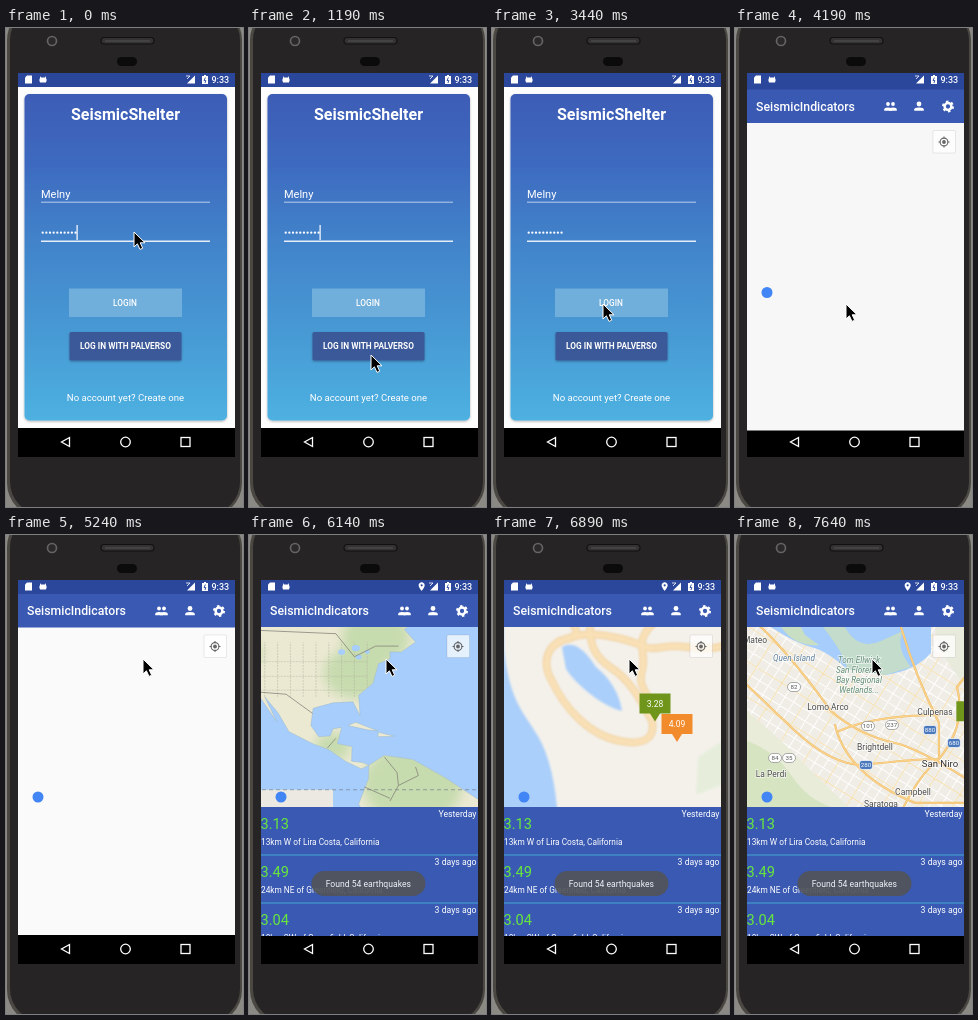
An HTML page that plays this animation: 237x479 px, repeating every 8000 ms.

```html
<!DOCTYPE html>
<html lang="en">
<head>
<meta charset="utf-8">
<title>Earthquake app</title>
<style>
html, body { margin: 0; width: 100%; height: 100%; overflow: hidden; background: #262425; }
svg { display: block; width: 237px; height: 479px; }
text { font-family: Roboto, "Noto Sans", sans-serif; fill: #fff; }
.mid { text-anchor: middle; }
.end { text-anchor: end; }
.line { fill: none; stroke-linecap: round; stroke-linejoin: round; }
.thin path { vector-effect: non-scaling-stroke; }
.place text { stroke: #fff; stroke-width: 1.5; stroke-opacity: .75; paint-order: stroke; }
</style>
</head>
<body>
<svg viewBox="0 0 237 479">
  <defs>
    <linearGradient id="sky" x1="0" y1="0" x2="0" y2="1">
      <stop offset="0" stop-color="#3c5cb6"/>
      <stop offset=".2" stop-color="#3d69bf"/>
      <stop offset=".45" stop-color="#4283ca"/>
      <stop offset=".75" stop-color="#479bd5"/>
      <stop offset="1" stop-color="#4eb1e1"/>
    </linearGradient>
    <filter id="shade" x="-20%" y="-20%" width="140%" height="150%">
      <feDropShadow dx="0" dy="1" stdDeviation="1" flood-opacity=".3"/>
    </filter>
    <filter id="soft"><feGaussianBlur stdDeviation=".8"/></filter>
    <filter id="haze" x="-50%" y="-50%" width="200%" height="200%"><feGaussianBlur stdDeviation="6"/></filter>
    <clipPath id="screenClip"><rect x="12" y="45" width="217" height="358"/></clipPath>
    <clipPath id="mapClip"><rect x="12" y="92" width="217" height="180"/></clipPath>
    <clipPath id="listClip"><rect x="12" y="272" width="217" height="129"/></clipPath>
    <clipPath id="landClip"><path id="landShape"/></clipPath>
  </defs>

  <!-- phone -->
  <rect width="237" height="479" fill="#8b8983"/>
  <rect x="1" y="-22" width="235" height="511" rx="34" fill="#4b4843"/>
  <rect x="4" y="-20" width="230" height="506" rx="32" fill="#262425"/>
  <circle cx="46" cy="13" r="4.5" fill="#2b292a" stroke="#656363" stroke-width="1.7"/>
  <rect x="95" y="9.5" width="53" height="6.5" rx="3.2" fill="#343233" stroke="#111" stroke-width="1.2"/>
  <path d="M99 13H144" stroke="#555"/>
  <rect x="111" y="29" width="20" height="9" rx="4.5" fill="#0b0b0c"/>

  <!-- screen -->
  <rect x="12" y="45" width="217" height="384" fill="#000"/>
  <rect x="12" y="45" width="217" height="17" fill="#2a479c"/>
  <g fill="none" stroke="#fff" stroke-width="1.3">
    <path d="M63.5 409.5V418.5L55.5 414Z"/>
    <circle cx="119.5" cy="414" r="4.8"/>
    <rect x="175" y="409.5" width="9" height="9"/>
  </g>

  <g id="login">
    <rect x="12" y="59" width="217" height="341" fill="#fdfdfe"/>
    <rect x="18.5" y="66" width="202.500" height="326.500" rx="5" fill="url(#sky)" filter="url(#shade)"/>
    <text class="mid" x="119.5" y="92" font-size="16" font-weight="700">SeismicShelter</text>
    <text x="35" y="169.500" font-size="11">Melny</text>
    <path d="M35 174.200H204" stroke="#b9cdea"/>
    <g id="dots" fill="#fff"></g>
    <rect id="caret" x="70.500" y="197" width="1.2" height="15" fill="#fff"/>
    <path d="M35 213.200H204" stroke="#e6eefa" stroke-width="1.5"/>
    <rect x="63" y="260.500" width="113" height="28.500" fill="#70aedb"/>
    <text class="mid" x="119" y="277.800" font-size="8.3" font-weight="500">LOGIN</text>
    <rect x="63.500" y="304" width="112" height="28.500" rx="1.5" fill="#3b5998" filter="url(#shade)"/>
    <text class="mid" x="119.500" y="321" font-size="8.3" font-weight="700">LOG IN WITH PALVERSO</text>
    <text class="mid" x="119.500" y="372.500" font-size="9.6">No account yet? Create one</text>
  </g>

  <g clip-path="url(#screenClip)">
    <g id="main">
      <rect x="12" y="45" width="217" height="15" fill="#2a479c"/>
      <rect id="blank" x="12" y="92" width="217" height="308" fill="#fafafa"/>
      <rect x="12" y="59" width="217" height="33.500" fill="#3959b3"/>
      <text x="21" y="80.300" font-size="12.300" font-weight="500">SeismicIndicators</text>
      <g id="tools" fill="#fff"></g>

      <g id="map" clip-path="url(#mapClip)">
        <rect x="12" y="92" width="217" height="180" fill="#a6cdfb"/>
        <g id="wide" class="thin"></g>
        <g id="bay"></g>
        <g id="city"></g>
        <g id="pins"></g>
      </g>

      <rect x="198" y="100" width="22.500" height="22.500" rx="1" fill="#fff" fill-opacity=".72" stroke="#000" stroke-opacity=".08"/>
      <g fill="none" stroke="#666" stroke-width="1.1">
        <circle cx="209" cy="111.500" r="3.900"/>
        <path d="M209 106V108M209 115V117M203.500 111.500H205.500M212.500 111.500H214.500"/>
      </g>
      <circle cx="209" cy="111.500" r="1.900" fill="#666"/>
      <circle cx="32" cy="262" r="5.500" fill="#4285f4"/>

      <g id="list" clip-path="url(#listClip)">
        <rect x="12" y="272" width="217" height="129" fill="#3959b3"/>
        <g id="rows"></g>
      </g>
      <g id="toast">
        <rect x="62.500" y="336" width="114" height="25" rx="12.500" fill="#515459"/>
        <text class="mid" x="119.300" y="352" font-size="8.600">Found 54 earthquakes</text>
      </g>
    </g>
  </g>

  <g fill="#fff">
    <path d="M21 47.500H26V55.500H19V49.500Z"/>
    <path d="M34 48L35 49.500H39L40 48V50Q41.500 52 40 54.500H34Q32.500 52 34 50Z"/>
    <path d="M180 48H184M181 51L184 48" stroke="#fff" stroke-width=".8"/>
    <path d="M189 47.500V55.500H181Z"/>
    <path d="M198 47H200V48H202V56H196V48H198Z"/>
    <path d="M199.400 49.500L198 52.500H199.800L199 55" fill="none" stroke="#2a479c" stroke-width=".9"/>
    <text x="205.500" y="55" font-size="9" font-weight="500">9:33</text>
    <path id="gps" transform="translate(167.500 46.500) scale(.43)" fill-rule="evenodd"
      d="M12 2C8.100 2 5 5.100 5 9c0 5.200 7 13 7 13s7-7.800 7-13c0-3.900-3.100-7-7-7zM12 6.500a2.500 2.500 0 1 1 0 5a2.500 2.500 0 0 1 0-5z"/>
  </g>

  <path id="cursor" d="M0 0V15L3.400 11.800L6 17.400L8.700 16.200L6.200 10.800H11Z" stroke="#fff"/>
</svg>

<script>
const $ = id => document.getElementById(id);
const fill = (id, html) => { $(id).innerHTML = html; };
const show = (id, alpha) => { $(id).style.opacity = +alpha; };
const clamp = v => Math.min(1, Math.max(0, v));
const times = (n, f) => Array.from({ length: n }, (_, i) => f(i)).join('');

// Login and toolbar details
fill('dots', times(10, i => `<circle cx="${36.7 + i * 3.65}" cy="204.700" r="1.15"/>`));

const body = (x, r) => `<circle cx="${x}" cy="73.500" r="${r}"/>
  <path d="M${x - 2 * r} 80.200V79Q${x - 2 * r} 77 ${x} 77T${x + 2 * r} 79V80.200Z"/>`;
fill('tools', body(158, 1.9) + body(153, 1.9) + body(184, 2.4) +
  `<g fill="none" stroke="#fff" transform="translate(213 76)">
    <circle r="3.400" stroke-width="2.500"/>
    <circle r="5" stroke-width="2" stroke-dasharray="2.400 2.836"/></g>`);

// Earthquake list
const quakes = [
  ['3.13', 'Yesterday', '13km W of Lira Costa, California'],
  ['3.49', '3 days ago', '24km NE of Greenfield, California'],
  ['3.04', '3 days ago', '10km SW of Greenfield, California']
];
fill('rows', quakes.map(([mag, when, where], i) => `<g transform="translate(0 ${i * 48})">
  <text class="end" x="227.500" y="281.800" font-size="8.700">${when}</text>
  <text x="11.500" y="294.300" font-size="14.600" style="fill:#68e83c">${mag}</text>
  <text x="12" y="310" font-size="8.300">${where}</text>
  <path d="M12 320H229" stroke="#3f8fc8" stroke-width="1.300"/></g>`).join(''));

// Wide map: "lon,lat" key points in Mercator projection
const DEG = 1024 / 360;
const project = (lon, lat) =>
  [337 + DEG * lon, 257 - DEG * 180 / Math.PI * Math.asinh(Math.tan(lat * Math.PI / 180))];
const trace = points => 'M' + points.split(' ').map(p => project(...p.split(',').map(Number))).join('L');
const land = [
  // North America down the Atlantic, back up the Pacific
  '-55,53 -65,49 -61,46 -66,43.5 -70,43.5 -70,41.7 -74,40.5 -76,35 -81,31.5 -80.5,25.2 -83,29.5 -90,29.2 ' +
  '-97,27.5 -97.8,22 -95,18.3 -91,18.6 -90,21 -87,21.4 -88.5,16 -83.3,15 -83.5,10 -79.5,9.5 -77.4,8.6 ' +
  '-80,7.3 -85.7,10 -91.5,14 -97,15.9 -105.5,20 -109.3,26 -114,31 -109.7,23.2 -117,32.5 -124,40 -130,54 -135,65 -55,65',
  '-77.4,8.6 -72,12 -62,10.6 -51,4.5 -35,-6 -39,-25 -70,-25 -81,-5 -77.5,4',
  '-84.8,22 -82,23.1 -74.2,20.2 -78,20.6',
  '-74,19.8 -68.4,18.5 -74.3,18.3',
  '-6,36 -17,21 -13,9 9,4 13,-20 40,-20 40,36'
].map(p => trace(p) + 'Z').join('');
const borders = [
  '-117,32.5 -106.5,31.8 -97.2,25.9', '-124,49 -89,48 -82.5,42.3 -75,45 -67,45',
  '-72,11.5 -67.5,6 -67,1.5 -70,-4', '-61,8 -60,5 -67,1.5', '-79,1 -70,-3', '-92,14.5 -89,17.8'
].map(trace).join('');
const stateLines = times(9, i => trace(`${-114 + i * 4.500},31 ${-114 + i * 4.500},46`)) +
  times(3, i => trace(`-120,${33 + i * 4} -78,${33 + i * 4}`));
const blob = (lon, lat, r) => {
  const [x, y] = project(lon, lat);
  return `<ellipse cx="${x}" cy="${y}" rx="${r}" ry="${r * .8}"/>`;
};
$('landShape').setAttribute('d', land);
fill('wide', `
  <path d="${land}" fill="#ece9d3"/>
  <g clip-path="url(#landClip)">
    <g filter="url(#haze)" fill="#c6dbae">
      ${blob(-82, 38, 32)}${blob(-75, 47, 34)}${blob(-90, 15, 18)}${blob(-62, 2, 50)}${blob(-121, 43, 18)}
    </g>
    <path d="${stateLines}" fill="none" stroke="#aeb39c" stroke-width=".5" stroke-dasharray="2 1"/>
  </g>
  <path d="${land}" fill="none" stroke="#9bb6c9" stroke-width=".5"/>
  <g fill="#a6cdfb">${blob(-87, 43.500, 3.5)}${blob(-82, 44.500, 4)}${blob(-81, 42.200, 3)}${blob(-78, 43.600, 2.5)}</g>
  <path d="${borders}" fill="none" stroke="#87867c" stroke-width=".8"/>
  <rect x="-130" y="257" width="211" height="120" fill="#ece9e2"/>
  <path d="M-130 257H520" stroke="#74808c" stroke-width=".7" stroke-dasharray="4 3"/>`);

// Middle zoom: soft bay with the roads around it
const road = (d, c, w) => `<path class="line" d="${d}" stroke="${c}" stroke-width="${w}"/>`;
const ring = 'M98 -60V92C98 112 104 122 118 132C140 146 150 168 160 186C164 206 148 210 128 206' +
  'C96 200 72 172 60 146C46 122 62 104 76 104Q90 100 80 88V-60' +
  'M60 112C80 96 104 98 130 104S150 116 172 112S210 120 240 108H500' +
  'M162 -60V88C140 108 156 116 150 136S164 160 160 186';
fill('bay', `
  <rect x="-900" y="-900" width="2000" height="2100" fill="#f4f1eb"/>
  <g filter="url(#soft)">
    <path d="M-900 -900H0L12 115C18 165 30 175 42 195Q60 220 65 272V1200H-900Z" fill="#aacffa"/>
    <path d="M70 112C84 104 96 120 104 132Q126 150 130 176C112 172 84 150 74 134Z" fill="#aacffa"/>
    <path d="M206 222L230 206V250L204 260Z" fill="#e6eedb"/>
    ${road(ring, '#efcf9a', 7.500)}${road(ring, '#f9e0b6', 5.500)}
  </g>`);

// Close zoom: street grid, freeways and labels
const streets = (step, c) => road(times(Math.ceil(640 / step), i => {
  const p = i * step - 320;
  return `M${p} -320V320M-320 ${p}H320`;
}), c, .9);
const freeways = 'M-40 30L30 96Q60 126 96 176Q124 200 160 208T300 290' +
  'M-40 100Q20 158 58 194T128 230Q180 224 204 224Q232 190 222 152L280 80' +
  'M158 40L166 92Q180 140 204 188V224Q172 250 150 320M104 196Q140 180 204 180' +
  'M100 190Q112 240 180 268H260';
const label = (x, y, s, c = '#4a4a4a', size = 8.500) =>
  `<text class="mid" x="${x}" y="${y}" font-size="${size}" style="fill:${c}">${s}</text>`;
const shield = (x, y, n) => {
  const blue = n % 100 === 80;
  return `<rect x="${x - 6.5}" y="${y - 4.5}" width="13" height="9" rx="${blue ? 2.5 : 4.5}"
    fill="${blue ? '#4a78bd' : '#fff'}" stroke="${blue ? '#fff' : '#888'}" stroke-width=".7"/>
    ${label(x, y + 2.3, n, blue ? '#fff' : '#555', 6.2)}`;
};
const reserve = ['Tom Ellwick', 'San Florenzo', 'Bay Regional', 'Wetlands...'];
fill('city', `
  <rect x="-300" y="-300" width="840" height="900" fill="#f0ede6"/>
  <g transform="translate(120 182) rotate(32)">${streets(10, '#fff')}${streets(30, '#f5deaa')}</g>
  <path d="M-200 168L12 176L44 204Q90 250 118 276L130 500H-200Z" fill="#e8ecd9"/>
  <path d="M12 206Q40 216 56 240T96 272H12Z" fill="#d7e4c1"/>
  <path d="M200 -100V92Q206 130 240 158H400V-100Z" fill="#e8ebdb"/>
  <path d="M36 -100V92Q60 108 76 112T112 134L150 140Q180 136 196 118V-100Z" fill="#a6cdfb"/>
  <path d="M88 92Q110 120 112 134L150 140L176 132Q160 112 168 96L150 104Q124 118 110 92Z" fill="#c3dccb"/>
  <path d="M46 92Q60 112 84 110L70 100L66 92Z" fill="#c9dfc4"/>
  ${road(freeways, '#e9b765', 2.200)}${road(freeways, '#fbd288', 1.400)}
  ${shield(59, 152, 82)}${shield(40, 223, 84)}${shield(54, 223, 35)}${shield(133, 191, 101)}
  ${shield(157, 190, 237)}${shield(131, 230, 280)}${shield(195, 195, 880)}${shield(219, 208, 680)}
  <g class="place">
    <g font-style="italic">${label(59, 126, 'Quen Island', '#5c7f9c', 8.200)}
      ${reserve.map((s, i) => label(124, 128 + i * 10, s, '#5e8a72', 8.200)).join('')}</g>
    ${label(20, 108, 'Mateo')}${label(93, 175, 'Lomo Arco')}${label(200, 180, 'Culpenas')}
    ${label(140, 215, 'Brightdell')}${label(205, 232, 'San Niro', '#333', 9.600)}
    ${label(36, 242, 'La Perdi')}${label(178, 260, 'Campbell')}${label(146, 272, 'Saratoga')}
  </g>`);

const pins = [[43, 4.5, '3.28', '#6f951b'], [65, 25, '4.09', '#f28b2c']];
fill('pins', pins.map(([, , mag, c]) => `<g><path d="M-15.500 -28H15.500V-8H5L0 0L-5 -8H-15.500Z" fill="${c}"/>
  <text class="mid" y="-14.700" font-size="8.500">${mag}</text></g>`).join(''));

// Pointer moves: start, end, and where it comes to rest
const moves = [
  [0, 1050, 122, 327], [1190, 1940, 120, 149], [2090, 2390, 120, 273],
  [2390, 2990, 111, 276], [4640, 5240, 137, 124]
];
const pointer = t => moves.reduce(([x, y], [from, to, mx, my]) => {
  const u = clamp((t - from) / (to - from)), e = u * u * (3 - 2 * u);
  return [x + (mx - x) * e, y + (my - y) * e];
}, [128, 204]);

// Camera flies from 0,0 to the bay while the zoom eases in
const NEAR = 4.08, CLOSE = 5.08;
const home = project(-122.03, 37.37), origin = project(0, 0);
const camera = t => {
  const left = (1 - clamp((t - 5690) / 900)) ** 1.45;
  const zoom = 5.404 * (1 - .245 ** (Math.max(0, t - 6140) / 750));
  return [...home.map((v, i) => v + (origin[i] - v) * left), zoom];
};
const layer = (id, zoom, x, y, alpha) => {
  const g = $(id);
  g.style.display = alpha > 0 ? '' : 'none';
  g.style.opacity = alpha;
  g.setAttribute('transform', `translate(120 182) scale(${Math.exp(zoom)}) translate(${-x} ${-y})`);
};

function draw(t) {
  $('cursor').setAttribute('transform', `translate(${pointer(t)})`);
  show('caret', Math.floor((Math.min(t, 3440) + 95) / 497) % 2 === 0);

  const inside = t >= 4190, entering = t < 4340;
  $('login').style.display = inside ? 'none' : '';
  $('main').style.display = inside ? '' : 'none';
  $('main').setAttribute('transform', `translate(0 ${entering ? 2.5 : 0})`);
  $('blank').setAttribute('fill', entering ? '#f7f7f7' : '#fafafa');
  show('gps', t >= 5390);
  show('list', t >= 5540);
  show('rows', t >= 5690);
  show('toast', .92 * clamp((t - 5690) / 400));
  $('map').style.display = t >= 5690 ? '' : 'none';

  const [x, y, zoom] = camera(t);
  layer('wide', zoom, x, y, +(zoom < 3.6));
  layer('bay', zoom - NEAR, 120, 182, clamp((zoom - 3) / .5));
  layer('city', zoom - CLOSE, 120, 182, clamp((zoom - 4.6) / .3));
  show('pins', zoom > 3);
  const spread = Math.exp(zoom - NEAR);
  [...$('pins').children].forEach((g, i) =>
    g.setAttribute('transform', `translate(${120 + pins[i][0] * spread} ${182 + pins[i][1] * spread})`));
}

// The picture refreshes every 150 ms, with one tick 10 ms early
const hold = t => {
  const base = t < 1190 ? 0 : 1190;
  return Math.min(7640, base + Math.floor((t - base) / 150) * 150);
};
const start = performance.now();
function tick() {
  draw(hold((performance.now() - start) % 8000));
  requestAnimationFrame(tick);
}
tick();
</script>
</body>
</html>
```
